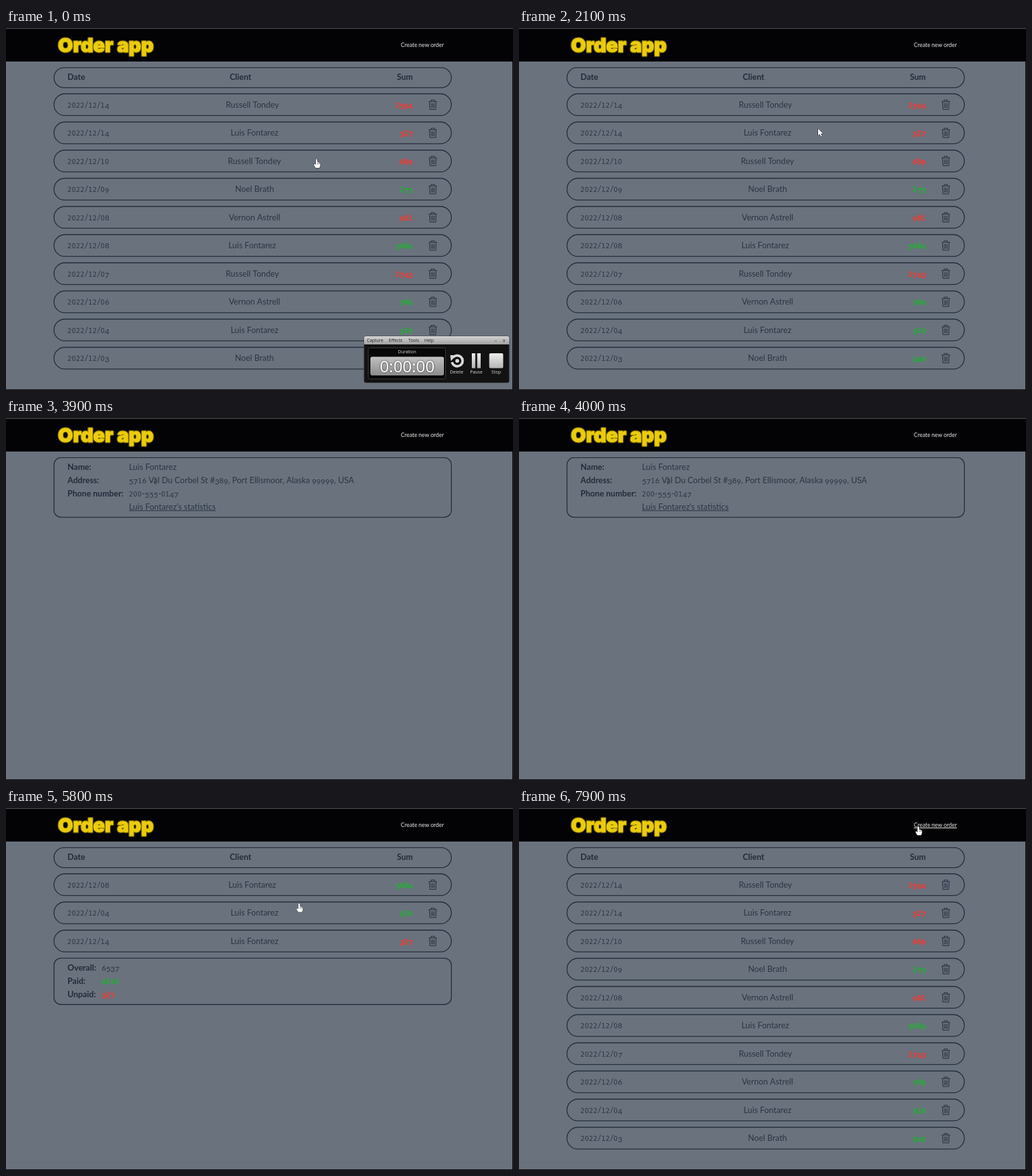
An HTML page with a canvas that plays this animation: 800 by 572 pixels, repeating every 8000 ms.

```html
<!DOCTYPE html>
<html lang="en">
<head>
<meta charset="utf-8">
<title>Order app</title>
<style>
html, body { margin: 0; width: 100%; height: 100%; overflow: hidden; background: #6a727e; }
canvas { display: block; width: 800px; height: 572px; }
</style>
</head>
<body>
<canvas id="stage" width="800" height="572"></canvas>
<script>
const ctx = document.getElementById('stage').getContext('2d');
const LOOP = 8000, STEP = 100;
const INK = '#222c3a', TEXT = '#2b3543', RED = '#f83a30', GREEN = '#1fb32f';
const SANS = 'Lato, sans-serif';

const RUSSELL = 'Russell Tondey', LUIS = 'Luis Fontarez', NOEL = 'Noel Brath', VERNON = 'Vernon Astrell';
const ORDERS = [
  ['2022/12/14', RUSSELL, '2594', RED],
  ['2022/12/14', LUIS, '327', RED],
  ['2022/12/10', RUSSELL, '689', RED],
  ['2022/12/09', NOEL, '275', GREEN],
  ['2022/12/08', VERNON, '981', RED],
  ['2022/12/08', LUIS, '5684', GREEN],
  ['2022/12/07', RUSSELL, '2743', RED],
  ['2022/12/06', VERNON, '789', GREEN],
  ['2022/12/04', LUIS, '526', GREEN],
  ['2022/12/03', NOEL, '349', GREEN]
];
const LUIS_ORDERS = [ORDERS[5], ORDERS[8], ORDERS[1]];

// Cursor keys: time, x, y, shape from that time on
const CURSOR = [
  [0, 490, 207, 'hand'], [400, 490, 207, 'hand'], [1100, 472, 159, 'hand'],
  [2100, 472, 159, 'arrow'], [2600, 472, 159, 'arrow'], [3200, 235, 99, 'hand'],
  [3700, 235, 99, 'arrow'], [3800, 235, 99, 'beam'], [4300, 235, 99, 'arrow'],
  [4600, 299, 143, 'hand'], [5400, 299, 143, 'arrow'], [5600, 299, 143, 'hand'],
  [6000, 626, 158, 'hand'], [6200, 510, 110, 'arrow'], [6500, 232, 28, 'arrow'],
  [6600, 222, 35, 'hand'], [7100, 222, 35, 'arrow'], [7300, 222, 35, 'arrow'],
  [7800, 622, 30, 'hand'], [7900, 630, 29, 'hand'], [LOOP, 630, 29, 'hand']
];
const ARROW = [[0, 0], [0, 11], [2.6, 8.6], [4.4, 12.6], [6, 12], [4.3, 8], [7.6, 8]];
const HAND = [[-1.2, 1], [0, 0], [1.2, 1], [1.4, 5], [3.5, 5.2], [5.5, 6.2], [6, 7.5], [5.8, 11],
  [4.5, 14], [-1.3, 14], [-4, 10], [-3.8, 8], [-2.6, 8], [-1.2, 9.3]];

// Old-style figures: 0-2 sit at x-height, 3 4 5 7 9 hang below the baseline
function glyphStyle(part) {
  if (/^[012]$/.test(part)) return ['10px "DejaVu Sans", sans-serif', 0, 0.4];
  if (/^[34579]$/.test(part)) return [`12px ${SANS}`, 2, 0];
  if (/^[68]$/.test(part)) return [`12px ${SANS}`, 0, 0];
  return [`13px ${SANS}`, 0, 0];
}

function figures(text, x, y, paint = true) {
  let pen = x;
  for (const part of text.split(/(\d)/)) {
    if (!part) continue;
    const [font, drop, gap] = glyphStyle(part);
    ctx.font = font;
    if (paint) ctx.fillText(part, pen, y + drop);
    pen += ctx.measureText(part).width + gap;
  }
  return pen - x;
}
const widthOf = text => figures(text, 0, 0, false);

function label(text, x, y, font, color = INK, align = 'left') {
  ctx.font = font;
  ctx.fillStyle = color;
  ctx.textAlign = align;
  ctx.fillText(text, x, y);
  ctx.textAlign = 'left';
  return ctx.measureText(text).width;
}
const bold = (text, x, y, align) => label(text, x, y, `bold 13px ${SANS}`, INK, align);

function value(text, x, y, color = TEXT) {
  ctx.save();
  ctx.fillStyle = color;
  if (color !== TEXT) {
    ctx.shadowColor = color;
    ctx.shadowBlur = 2;
  }
  const width = figures(text, x, y);
  ctx.restore();
  return width;
}

function link(text, x, y) {
  const width = value(text, x, y);
  ctx.fillStyle = TEXT;
  ctx.fillRect(x, Math.round(y + 1), width, 1);
}

function box(x, y, w, h, r) {
  ctx.beginPath();
  ctx.roundRect(x, y, w, h, r);
}

function card(top, bottom, r) {
  ctx.strokeStyle = INK;
  ctx.lineWidth = 1.3;
  box(75.7, top, 627, bottom - top, r);
  ctx.stroke();
}

function line(x1, y1, x2, y2) {
  ctx.moveTo(x1, y1);
  ctx.lineTo(x2, y2);
}

function trash(x, y) {
  ctx.save();
  ctx.translate(x, y);
  ctx.strokeStyle = INK;
  ctx.lineWidth = 1;
  ctx.beginPath();
  line(-6.5, -5, 6.5, -5);
  ctx.moveTo(-2.7, -5);
  ctx.lineTo(-2.7, -7.4);
  ctx.lineTo(2.7, -7.4);
  ctx.lineTo(2.7, -5);
  ctx.moveTo(-5.3, -5);
  ctx.lineTo(-4.6, 7.4);
  ctx.lineTo(4.6, 7.4);
  ctx.lineTo(5.3, -5);
  for (const dx of [-2.4, 0, 2.4]) line(dx, -2.6, dx * 0.9, 5.2);
  ctx.stroke();
  ctx.restore();
}

function orderTable(orders) {
  card(62.7, 94.3, 15.8);
  bold('Date', 97, 82.3);
  bold('Client', 370, 82.3, 'center');
  bold('Sum', 642, 82.3, 'right');
  orders.forEach(([date, client, sum, color], i) => {
    const mid = 121.2 + 44.5 * i, base = mid + 4.6;
    card(mid - 17.2, mid + 17.2, 17.2);
    const dateEnd = 97 + value(date, 97, base);
    const sumStart = 642 - widthOf(sum);
    value(client, (dateEnd + sumStart - widthOf(client)) / 2, base);
    value(sum, sumStart, base, color);
    trash(673.5, mid);
  });
}

function details(top, bottom, x, first, rows) {
  card(top, bottom, 11);
  rows.forEach(([name, text, style], i) => {
    const y = first + 21 * i + 4.4;
    bold(name, 97, y);
    if (style === 'link') link(text, x, y);
    else value(text, x, y, style);
  });
}

const pages = {
  list: () => orderTable(ORDERS),
  order: () => details(62.7, 178, 175, 78, [
    ['Date:', '2022/12/14'],
    ['Client:', LUIS, 'link'],
    ['Description:', 'description of order 9'],
    ['Sum:', '327'],
    ['Status:', 'Unpaid', RED]
  ]),
  client: () => details(62.7, 156.8, 194, 78, [
    ['Name:', LUIS],
    ['Address:', '5716 Val Du Corbel St #389, Port Ellismoor, Alaska 99999, USA'],
    ['Phone number:', '200-555-0147'],
    ['', LUIS + "'s statistics", 'link']
  ]),
  stats: () => {
    orderTable(LUIS_ORDERS);
    details(237.3, 310.5, 151, 253, [
      ['Overall:', '6537'],
      ['Paid:', '6210', GREEN],
      ['Unpaid:', '327', RED]
    ]);
  }
};

function pageAt(t) {
  if (t < 2200) return 'list';
  if (t < 3800) return 'order';
  if (t < 5500) return 'client';
  return t < 7200 ? 'stats' : 'list';
}

function frameAndHeader(hovered) {
  ctx.fillStyle = '#6a727e';
  ctx.fillRect(0, 0, 800, 572);
  ctx.fillStyle = '#030204';
  ctx.fillRect(0, 0, 800, 53);
  ctx.fillRect(799, 53, 1, 519);
  ctx.fillRect(0, 571, 800, 1);
  ctx.fillStyle = '#4a4a4c';
  ctx.fillRect(0, 0, 800, 1.3);

  ctx.font = '900 30.5px Inter, sans-serif';
  ctx.lineJoin = 'round';
  ctx.strokeStyle = '#66590a';
  ctx.lineWidth = 3.4;
  ctx.strokeText('Order app', 82, 38);
  ctx.strokeStyle = ctx.fillStyle = '#ebcc0c';
  ctx.lineWidth = 1;
  ctx.strokeText('Order app', 82, 38);
  ctx.fillText('Order app', 82, 38);

  const width = label('Create new order', 623, 30, `8.9px ${SANS}`, '#eeeeee');
  if (hovered) ctx.fillRect(623, 31, width, 1);
}

function gradient(y1, y2, from, to) {
  const g = ctx.createLinearGradient(0, y1, 0, y2);
  g.addColorStop(0, from);
  g.addColorStop(1, to);
  return g;
}

function recorder(alpha) {
  const small = '7px "Open Sans", sans-serif';
  ctx.save();
  ctx.globalAlpha = alpha;
  ctx.fillStyle = '#121212';
  box(565, 487, 229, 73.5, 3);
  ctx.fill();
  ctx.strokeStyle = '#3c3c3c';
  ctx.lineWidth = 1;
  ctx.stroke();
  ctx.fillStyle = gradient(487, 500, '#d2d2d2', '#a2a2a2');
  box(565, 487, 229, 13, [3, 3, 0, 0]);
  ctx.fill();
  [['Capture', 569.5], ['Effects', 604], ['Tools', 635], ['Help', 660], ['–', 771], ['x', 784]]
    .forEach(([text, x]) => label(text, x, 496, small, '#222222'));

  box(571.5, 505.5, 122, 49, 3);
  ctx.fillStyle = '#080808';
  ctx.fill();
  ctx.stroke();
  label('Duration', 633, 513.5, small, '#dddddd', 'center');
  box(575, 519.5, 116, 29.5, 3);
  ctx.fillStyle = gradient(519, 549, '#c2c2c2', '#8c8c8c');
  ctx.fill();
  ctx.shadowColor = '#333333';
  ctx.shadowBlur = 3;
  label('0:00:00', 633, 543.5, '25.5px "Open Sans", sans-serif', '#ffffff', 'center');
  ctx.shadowBlur = 0;

  ctx.strokeStyle = '#d8d8d8';
  ctx.lineWidth = 4;
  ctx.beginPath();
  ctx.arc(712, 526, 8.5, -2.4, 2.9);
  ctx.stroke();
  ctx.fillStyle = '#d8d8d8';
  ctx.beginPath();
  ctx.moveTo(701, 517);
  ctx.lineTo(711, 517);
  ctx.lineTo(702, 526);
  ctx.fill();
  ctx.beginPath();
  ctx.arc(712, 526, 3, 0, 7);
  ctx.fill();
  ctx.fillStyle = gradient(514, 538, '#eeeeee', '#b4b4b4');
  ctx.fillRect(735, 514, 5.5, 23.5);
  ctx.fillRect(743.5, 514, 5.5, 23.5);
  box(762.5, 514, 22, 23.5, 2);
  ctx.fill();
  [['Delete', 711], ['Pause', 742], ['Stop', 773.5]]
    .forEach(([text, x]) => label(text, x, 546, small, '#dddddd', 'center'));
  ctx.restore();
}

function cursorAt(t) {
  const next = CURSOR.findIndex(key => key[0] > t);
  const [t0, x0, y0, shape] = CURSOR[next - 1];
  const [t1, x1, y1] = CURSOR[next];
  const p = (t - t0) / (t1 - t0), ease = p * p * (3 - 2 * p);
  return { x: x0 + (x1 - x0) * ease, y: y0 + (y1 - y0) * ease, shape };
}

function drawCursor({ x, y, shape }) {
  ctx.save();
  ctx.translate(x, y);
  ctx.beginPath();
  ctx.lineJoin = 'round';
  ctx.strokeStyle = '#15181d';
  ctx.lineWidth = 1;
  if (shape === 'beam') {
    ctx.strokeStyle = TEXT;
    ctx.lineWidth = 0.7;
    line(0.5, -4.5, 0.5, 5);
    line(-1, -4.5, 2, -4.5);
    line(-1, 5, 2, 5);
    ctx.stroke();
  } else {
    (shape === 'hand' ? HAND : ARROW).forEach(([px, py]) => ctx.lineTo(px, py));
    ctx.closePath();
    ctx.stroke();
    ctx.fillStyle = '#ffffff';
    ctx.fill();
    if (shape === 'hand') {
      ctx.lineWidth = 0.5;
      ctx.beginPath();
      for (const dx of [1.4, 3.2, 4.7]) line(dx, 6, dx, 8.5);
      ctx.stroke();
    }
  }
  ctx.restore();
}

function draw(now) {
  const t = Math.floor((now % LOOP) / STEP) * STEP;
  frameAndHeader(t >= 7800);
  pages[pageAt(t)]();
  if (t < 300) recorder([1, 0.4, 0.1][t / STEP]);
  drawCursor(cursorAt(t));
}

const start = performance.now();
function tick() {
  draw(performance.now() - start);
  requestAnimationFrame(tick);
}
tick();
</script>
</body>
</html>
```
